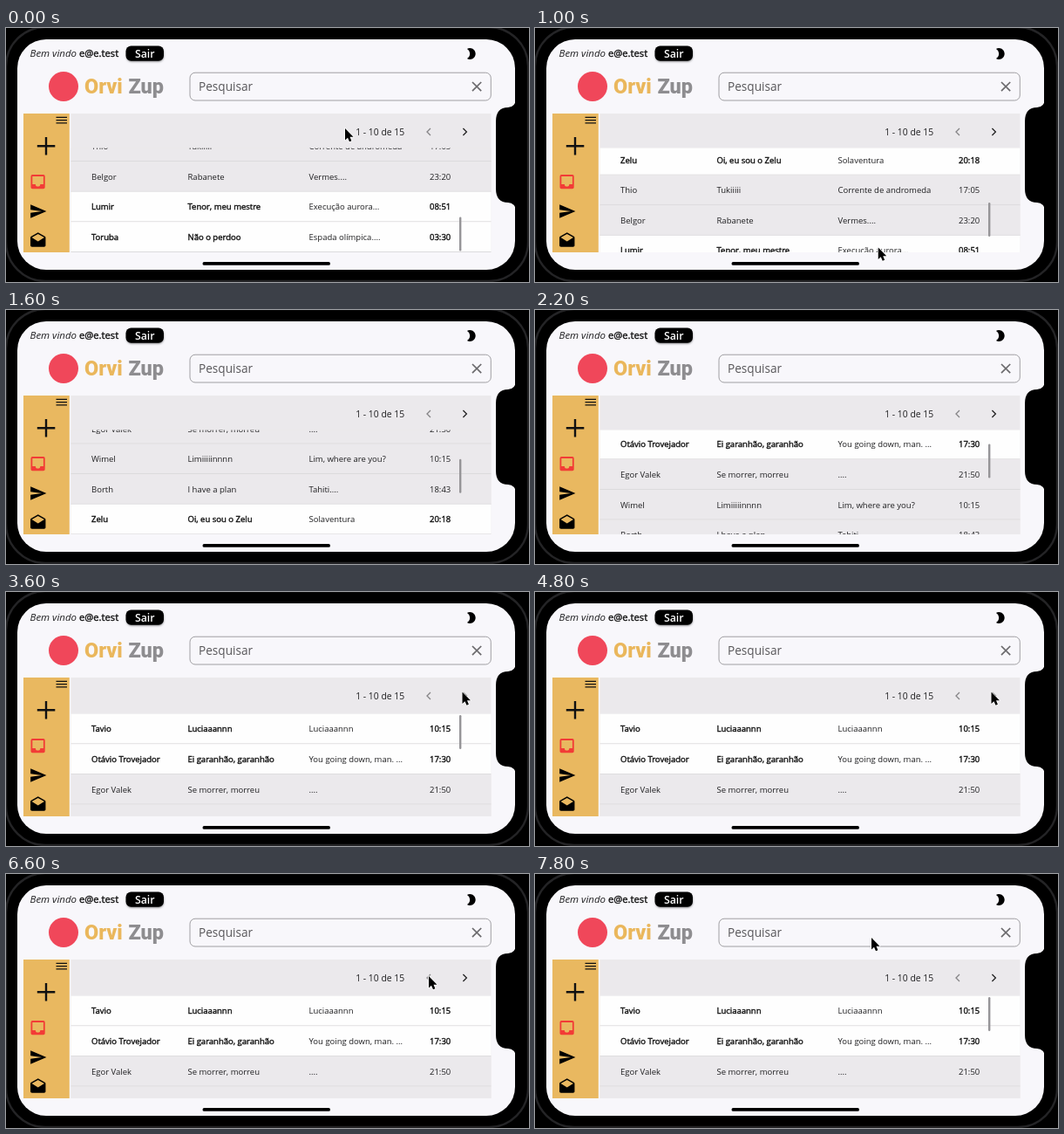
Write an HTML page that moves like this. It is 600 by 291 pixels and loops after 8000 ms.

```html
<!DOCTYPE html>
<html lang="pt">
<head>
<meta charset="utf-8">
<title>Caixa de entrada</title>
<style>
  html, body { margin: 0; width: 100%; height: 100%; overflow: hidden; background: #000; }
  svg { display: block; width: 100%; height: 100%; }
  text { font-family: "Open Sans", "Noto Sans", sans-serif; fill: #1f1f21; white-space: pre; }
  .row text { font-size: 9.5px; }
  .heavy { stroke: #111; stroke-width: .38px; fill: #111; }
  .line { fill: none; stroke: #111; }
  .brand { font: 800 23.4px Roboto, sans-serif; }
</style>
</head>
<body>
<svg viewBox="0 0 600 291">
  <defs>
    <clipPath id="listArea"><rect x="73" y="137.5" width="484" height="119.5"/></clipPath>
    <filter id="soft" x="-20%" y="-30%" width="140%" height="190%"><feGaussianBlur stdDeviation=".9"/></filter>
  </defs>

  <!-- phone -->
  <rect width="600" height="291"/>
  <rect x="0" y="-1" width="599" height="291" rx="45" fill="#000" stroke="#242426" stroke-width="2.4"/>
  <rect x="13" y="13" width="571" height="264" rx="33" fill="#f8f7fb"/>
  <path d="M586 80Q584 91 576 91Q562 91 562 107V184Q562 200 576 200Q584 200 586 211Z"/>
  <rect x="225.5" y="268" width="146.5" height="3.8" rx="1.9"/>

  <!-- top bar -->
  <text x="27.5" y="33" font-size="11.5" font-style="italic">Bem vindo</text>
  <text x="84" y="33" font-size="11.2" class="heavy">e@e.test</text>
  <rect x="138" y="22" width="43" height="16.8" rx="6" fill="#8a8a8c" filter="url(#soft)"/>
  <rect x="137.5" y="20.5" width="43.5" height="17.3" rx="6" fill="#000"/>
  <text x="159.2" y="33.8" font-size="12.3" font-weight="600" text-anchor="middle" style="fill:#fff">Sair</text>
  <path transform="translate(526 21.7) scale(.65)" d="M9.5 2c-1.82 0-3.53.5-5 1.35 2.99 1.73 5 4.95 5 8.65s-2.01 6.92-5 8.65c1.47.85 3.18 1.35 5 1.35 5.52 0 10-4.48 10-10S15.02 2 9.5 2z"/>

  <!-- brand and search -->
  <circle cx="66" cy="67" r="17" fill="#f0475a"/>
  <text x="90" y="75.2" class="brand" style="fill:#eab75c">Orvi</text>
  <text x="140.5" y="75.2" class="brand" style="fill:#8e8d90">Zup</text>
  <rect x="211" y="51.2" width="345.3" height="31.8" rx="6" fill="none" stroke="#a09fa3"/>
  <text x="221" y="71.5" font-size="13.6" style="fill:#58575a">Pesquisar</text>
  <path class="line" style="stroke:#6a696c;stroke-width:1.7" d="M535 62l10.2 10.2M545.2 62L535 72.2"/>

  <!-- sidebar -->
  <rect x="20" y="98" width="52.8" height="159" fill="#e9b860"/>
  <path class="line" stroke-width="1.3" d="M57.5 102.3h12.5M57.5 105.6h12.5M57.5 108.9h12.5"/>
  <path class="line" stroke-width="2.4" d="M46 125v20.5M35.8 135.3h20.5"/>
  <path transform="translate(25.8 165.4) scale(.9)" fill="#f23b36" fill-rule="evenodd" d="M19 3H5a2 2 0 0 0-2 2v14a2 2 0 0 0 2 2h14a2 2 0 0 0 2-2V5a2 2 0 0 0-2-2zm0 12h-4a3 3 0 0 1-6 0H5V5h14z"/>
  <path transform="translate(26.4 199.6) scale(.87)" d="M2 21 23 12 2 3v7l15 2-15 2z"/>
  <path transform="translate(26.3 233.3) scale(.87)" d="M21.99 8c0-.72-.37-1.35-.94-1.7L12 1 2.95 6.3C2.38 6.65 2 7.28 2 8v10c0 1.1.9 2 2 2h16c1.1 0 2-.9 2-2l-.01-10zM12 13 3.74 7.84 12 3l8.26 4.84L12 13z"/>

  <!-- message list -->
  <rect x="74.5" y="98" width="482" height="159" fill="#ebe9ec"/>
  <g clip-path="url(#listArea)">
    <g class="row" id="pageOne"></g>
    <g class="row" id="pageTwo"></g>
  </g>
  <text id="range" x="457.2" y="122.7" font-size="10.4" text-anchor="end"></text>
  <path id="prev" class="line" stroke-width="1.3" d="M487 115l-4 4 4 4"/>
  <path id="next" class="line" stroke-width="1.3" d="M524.4 115l4 4-4 4"/>
  <rect id="thumb" x="520" width="2.4" height="39" rx="1.2" fill="#969598"/>

  <path id="cursor" d="M0 0V13.4L3 10.7 5 15.2 7.4 14.2 5.5 9.8H9.5Z" stroke="#fff" stroke-width="1.6" stroke-linejoin="round" paint-order="stroke"/>
</svg>
<script>
const $ = id => document.getElementById(id);
const LOOP = 8000, TICK = 200, ROW = 34.6, TOP = 139.7;
const COLUMNS = [98, 208.5, 347.5, 486];
const ENABLED = '#222', DISABLED = '#858487';

// [unread, sender, subject, preview, time]
const pageOne = [
  [1, 'Tavio', 'Luciaaannn', 'Luciaaannn', '10:15'],
  [1, 'Otávio Trovejador', 'Ei garanhão, garanhão', 'You going down, man. ...', '17:30'],
  [0, 'Egor Valek', 'Se morrer, morreu', '....', '21:50'],
  [0, 'Wimel', 'Limiiiiinnnn', 'Lim, where are you?', '10:15'],
  [0, 'Borth', 'I have a plan', 'Tahiti....', '18:43'],
  [1, 'Zelu', 'Oi, eu sou o Zelu', 'Solaventura', '20:18'],
  [0, 'Thio', 'Tukiiiii', 'Corrente de andromeda', '17:05'],
  [0, 'Belgor', 'Rabanete', 'Vermes....', '23:20'],
  [1, 'Lumir', 'Tenor, meu mestre', 'Execução aurora...', '08:51'],
  [1, 'Toruba', 'Não o perdoo', 'Espada olímpica....', '03:30']
];
const pageTwo = [
  [0, 'Mekor', 'Orumiiiii', 'Golpe mekor', '03:30'],
  [1, 'Corredinho', 'Arriba arriba', 'Arriba arriba', '00:15'],
  [1, 'Comevento', 'Beep beep', 'Beep beep', '21:12'],
  [0, '', '', '', '']
];

function rowMarkup([unread, ...cells], i) {
  const y = TOP + i * ROW;
  const texts = cells.map((cell, c) =>
    `<text x="${COLUMNS[c]}" y="${y + 20.7}" class="${unread && c !== 2 ? 'heavy' : ''}">${cell}</text>`);
  return `<rect x="74.5" y="${y}" width="482" height="${ROW}" fill="${unread ? '#fefefe' : '#ebe9ec'}"/>
    <rect x="74.5" y="${y + ROW - .9}" width="482" height=".9" fill="#d9d7da"/>` + texts.join('');
}
$('pageOne').innerHTML = pageOne.map(rowMarkup).join('');
$('pageTwo').innerHTML = pageTwo.map(rowMarkup).join('');

// [time, offset]
const scrollKeys = [[0, 228.8], [400, 228.8], [1200, 162], [1400, 128], [1600, 90], [1800, 62],
  [2000, 62], [2200, 37.6], [2600, 37.6], [2800, 26], [3000, 10], [3200, 0]];
// [time, x, y]
const cursorPaths = [
  [[0, 389, 115], [400, 390, 190], [1200, 395, 272], [1400, 396, 281]],
  [[2800, 455, 215], [3000, 484, 175], [3200, 508, 139], [3400, 520, 119], [3600, 523.5, 114.5], [5400, 523.5, 114.5],
   [5600, 514, 115], [6000, 485, 117], [6600, 485, 117], [6800, 478, 115], [7200, 430, 94], [7600, 388, 74], [7800, 386, 73]]
];

function sample(keys, t) {
  const k = keys.findIndex(key => key[0] > t);
  if (k < 0) return keys[keys.length - 1].slice(1);
  const a = keys[k - 1], b = keys[k], p = (t - a[0]) / (b[0] - a[0]);
  return a.slice(1).map((v, i) => v + (b[i + 1] - v) * p);
}
const show = (el, on) => el.setAttribute('visibility', on ? 'visible' : 'hidden');

function draw(t) {
  const second = t >= 5200 && t < 6600;
  const [scroll] = sample(scrollKeys, t);
  $('pageOne').setAttribute('transform', `translate(0 ${-scroll})`);
  show($('pageOne'), !second);
  show($('pageTwo'), second);
  $('range').textContent = second ? '11 - 15 de 15' : '1 - 10 de 15';
  $('prev').style.stroke = second ? ENABLED : DISABLED;
  $('next').style.stroke = second ? DISABLED : ENABLED;
  show($('thumb'), t < 3800 || t >= 7600);
  $('thumb').setAttribute('y', 141 + scroll * .33);

  const path = cursorPaths.find(p => t >= p[0][0] && t <= p[p.length - 1][0]);
  show($('cursor'), path);
  if (path) $('cursor').setAttribute('transform', `translate(${sample(path, t).join(' ')})`);
}

const start = performance.now();
function loop() {
  const t = (performance.now() - start) % LOOP;
  draw(Math.floor(t / TICK) * TICK);
  requestAnimationFrame(loop);
}
draw(0);
requestAnimationFrame(loop);
</script>
</body>
</html>
```
